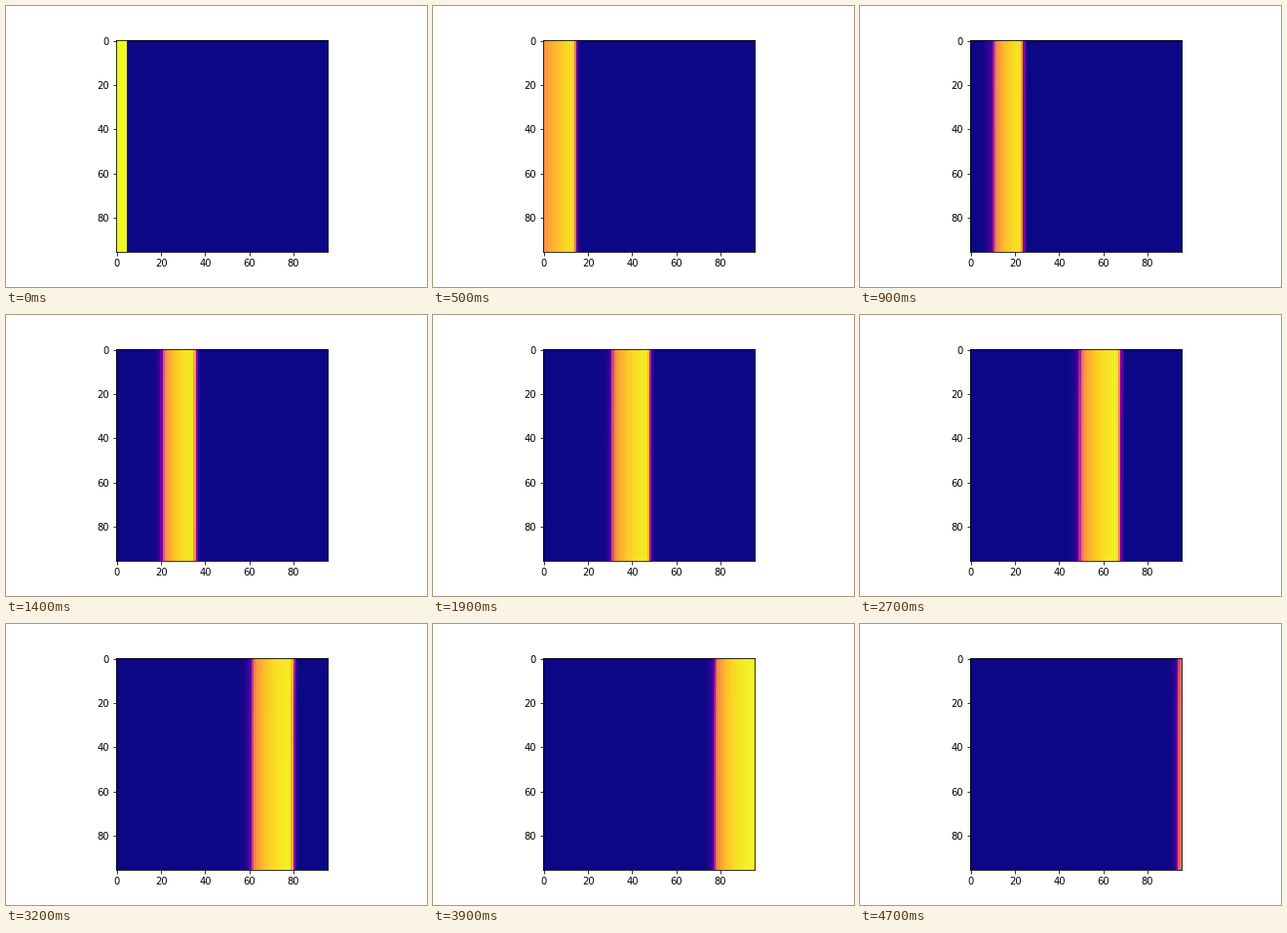
Write a matplotlib script that moves like this. It is 432 px wide and 288 px high and loops after 4.8 s.

```python
import numpy as np
import matplotlib.pyplot as plt
from matplotlib.animation import FuncAnimation

N = 96          # cells per side
FRAMES = 48
STEP_MS = 100

x = np.arange(N) + 0.5
rows = np.arange(N)[:, None]

# Time at which the recovering tail passes a given position.
TAIL_X = [0, 5, 11, 31.4, 49.8, 61.5, 77.9, 94.2, 96]
TAIL_T = [5.6, 6.8, 9, 19, 27, 32, 39, 47, 47.8]
tail_time = np.interp(x, TAIL_X, TAIL_T)


def sigmoid(z):
    return 1 / (1 + np.exp(-np.clip(z, -60, 60)))


def front(t):
    """Position of the leading edge: a slow start, then constant speed."""
    return 1.55 + 2.455 * t + 3.45 * np.exp(-t / 4)


def field(i):
    """Excitation pulse travelling to the right."""
    if i == 0:
        return np.tile((x < 5).astype(float), (N, 1))
    # the wave runs slightly ahead along the upper edge
    t = i + 0.15 * i / FRAMES * np.exp(-rows / 14)
    rise = sigmoid(2.4 * (front(t) - x))
    d = 2.4 * (tail_time - t)
    plateau = 1 - 0.33 * np.exp(-np.maximum(d, 0) / 6.5)
    fall = plateau * sigmoid(2.2 * (d + 0.5))
    foot = 0.3 * np.exp(0.7 * np.minimum(d, 0))
    return rise * np.maximum(fall, foot)


fig, ax = plt.subplots(figsize=(6, 4), dpi=72, facecolor="white")
fig.subplots_adjust(left=0.125, right=0.9, bottom=0.125, top=0.88)
image = ax.imshow(field(0), cmap="plasma", vmin=0, vmax=1,
                  interpolation="nearest")
ax.set_xticks(range(0, N, 20))
ax.set_yticks(range(0, N, 20))


def update(i):
    image.set_data(field(i))
    return (image,)


anim = FuncAnimation(fig, update, frames=FRAMES, interval=STEP_MS,
                     init_func=lambda: update(0), repeat=True,
                     repeat_delay=0, blit=False)
plt.show()
```
